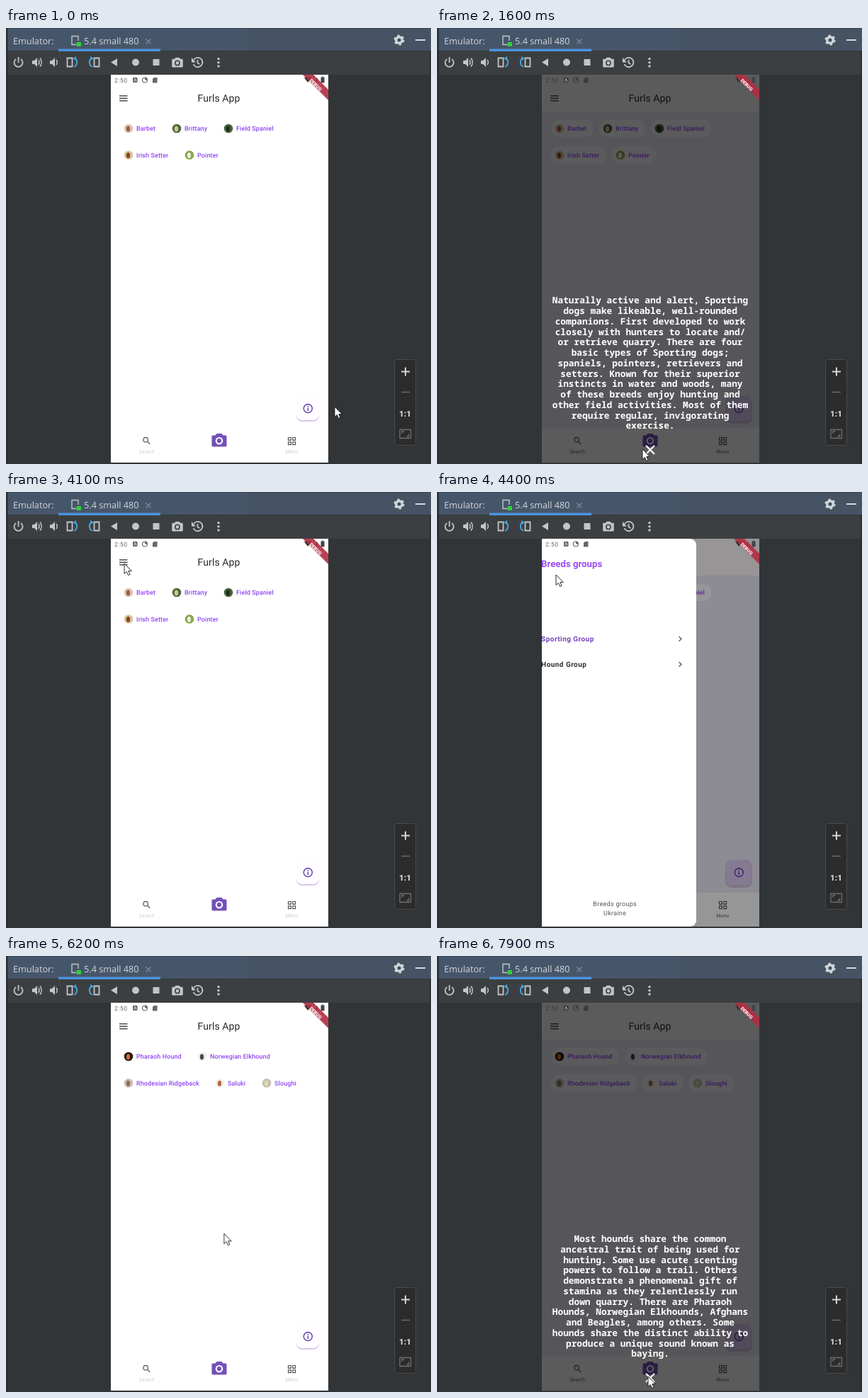
These frames come from a looping animation (600x616 px, 8000 ms). An HTML page:

```html
<!DOCTYPE html>
<html lang="en">
<head>
<meta charset="utf-8">
<title>Emulator demo</title>
<style>
html, body { margin: 0; width: 100%; height: 100%; overflow: hidden; background: #313537; }
svg { display: block; width: 600px; height: 616px; font-family: Roboto, sans-serif; }
.ui { font: 12.7px "Open Sans", sans-serif; fill: #d3d6d9; }
.line { fill: none; stroke: #c3c6c8; stroke-width: 1.8; }
.solid { fill: #c3c6c8; }
.chip { font-size: 9px; font-weight: 500; letter-spacing: .1px; fill: #9045f7; }
.about { font: bold 12.8px "Noto Sans Mono", monospace; fill: #fff; text-anchor: middle; }
.mid { text-anchor: middle; }

/* One loop is 8 s, so 1.25% is 100 ms. */
.tint, .dark, .copy, .drawer, .scrim, .first, .second, .cursor { animation: 8s linear infinite; }
.tint { animation-name: tint; }
.dark { animation-name: dark; }
.copy { animation-name: copy; }
.drawer { animation-name: drawer; }
.scrim { animation-name: scrim; }
.first { animation-name: first; animation-timing-function: step-end; }
.second { animation-name: second; animation-timing-function: step-end; }
.cursor { animation-name: cursor; animation-timing-function: ease-in-out; }

@keyframes tint {
  0%, 8.75% { opacity: 0 } 10%, 28.75% { opacity: 1 } 31.25%, 51.875% { opacity: 0 }
  53.125%, 63.125% { opacity: 1 } 64.75%, 85% { opacity: 0 } 86.25%, 100% { opacity: 1 }
}
@keyframes dark {
  0%, 8.75% { opacity: 0 } 10% { opacity: .03 } 13.75%, 27.5% { opacity: .63 }
  31.25%, 85% { opacity: 0 } 86.25% { opacity: .03 } 90%, 100% { opacity: .63 }
}
@keyframes copy {
  0%, 8.75% { opacity: 0 } 10% { opacity: .5 } 13.75%, 27.5% { opacity: 1 }
  31.25%, 85% { opacity: 0 } 86.25% { opacity: .5 } 90%, 100% { opacity: 1 }
}
@keyframes drawer {
  0%, 51.875% { transform: translateX(-231px); animation-timing-function: ease-out }
  55% { transform: translateX(-12px) }
  56.25%, 62.5% { transform: none; animation-timing-function: ease-in-out }
  65% { transform: translateX(-208px) }
  66.25%, 100% { transform: translateX(-231px) }
}
@keyframes scrim {
  0%, 51.875% { opacity: 0 } 55% { opacity: .4 } 56.25%, 62.5% { opacity: .43 }
  65%, 100% { opacity: 0 }
}
@keyframes first { 0% { visibility: visible } 62.5%, 100% { visibility: hidden } }
@keyframes second { 0% { visibility: hidden } 62.5%, 100% { visibility: visible } }
@keyframes cursor {
  0%, 1.25% { transform: translate(464px, 535px) }
  6.25%, 13.75% { transform: translate(432px, 544px) }
  18.75%, 20% { transform: translate(290px, 595px) }
  23.75%, 33.75% { transform: translate(301px, 591px) }
  41.25% { transform: translate(186px, 130px) }
  45%, 51.25% { transform: translate(167px, 101px) }
  55%, 56.25% { transform: translate(168px, 117px) }
  61.25%, 72.5% { transform: translate(181.5px, 238px) }
  82.5%, 95% { transform: translate(433px, 545px) }
  98.75%, 100% { transform: translate(298px, 594px) }
}
</style>
</head>
<body>
<script>
const box = (x, y, w, h, fill, extra = '') =>
  `<rect x="${x}" y="${y}" width="${w}" height="${h}" fill="${fill}" ${extra}/>`;
const text = (x, y, str, extra = '') => `<text x="${x}" y="${y}" ${extra}>${str}</text>`;
const line = (d, extra = '') => `<path class="line" d="${d}" ${extra}/>`;
const solid = (d, extra = '') => `<path class="solid" d="${d}" ${extra}/>`;
const dot = (x, y, r, fill, extra = '') => `<circle cx="${x}" cy="${y}" r="${r}" fill="${fill}" ${extra}/>`;
const stroke = (d, color, width = 1.2) => `<path d="${d}" fill="none" stroke="${color}" stroke-width="${width}"/>`;

// A breed chip: text start and end, row centre, name, two photo tones.
const chip = ([x, end, y, name, base, spot]) =>
  box(x - 23, y - 12, end - x + 33, 24, '#f9f7fc', 'rx="10" class="tint"') +
  dot(x - 11, y, 6.3, base) +
  `<ellipse cx="${x - 11.5}" cy="${y + .5}" rx="2.6" ry="4" fill="${spot}"/>` +
  text(x, y + 3.2, name, 'class="chip"');

const sporting = [
  [184, 211, 142, 'Barbet', '#d9c7b5', '#a35845'],
  [252, 284, 142, 'Brittany', '#51663a', '#cfc6a4'],
  [325, 377, 142, 'Field Spaniel', '#486339', '#232b22'],
  [184, 229, 179.5, 'Irish Setter', '#dbc39c', '#80452b'],
  [270, 299, 179.5, 'Pointer', '#8ba64c', '#f0efe5']
].map(chip).join('');
const hounds = [
  [184, 247, 142, 'Pharaoh Hound', '#24180f', '#d66d2b'],
  [288, 372, 142, 'Norwegian Elkhound', '#eeeeed', '#45454a'],
  [184, 272, 179.5, 'Rhodesian Ridgeback', '#c5beb5', '#8b6a54'],
  [313, 338, 179.5, 'Saluki', '#f3eeea', '#b56b3d'],
  [379, 410, 179.5, 'Sloughi', '#c2c2aa', '#e6d7b9']
].map(chip).join('');

const about = (copy) => {
  const lines = copy.trim().split('\n');
  return lines.map((str, i) =>
    text(301, 566.3 - (lines.length - 1 - i) * 14.75, str.trim(), 'class="about"')).join('');
};
const sportingCopy = about(`
  Naturally active and alert, Sporting
  dogs make likeable, well-rounded
  companions. First developed to work
  closely with hunters to locate and/
  or retrieve quarry. There are four
  basic types of Sporting dogs;
  spaniels, pointers, retrievers and
  setters. Known for their superior
  instincts in water and woods, many
  of these breeds enjoy hunting and
  other field activities. Most of them
  require regular, invigorating
  exercise.`);
const houndCopy = about(`
  Most hounds share the common
  ancestral trait of being used for
  hunting. Some use acute scenting
  powers to follow a trail. Others
  demonstrate a phenomenal gift of
  stamina as they relentlessly run
  down quarry. There are Pharaoh
  Hounds, Norwegian Elkhounds, Afghans
  and Beagles, among others. Some
  hounds share the distinct ability to
  produce a unique sound known as
  baying.`);

const camera = (x, y, s, fill, hole) => `<g transform="translate(${x} ${y}) scale(${s})">
  <path fill="${fill}" d="M-3.5-9h7l2 2.5H9q1.5 0 1.5 1.5V8Q10.500 9.500 9 9.500H-9Q-10.500 9.500-10.500 8V-5Q-10.500-6.500-9-6.500h3.500z"/>
  ${dot(0, 1.2, 4.2, 'none', `stroke="${hole}" stroke-width="2.2"`)}</g>`;
const speaker = (x) => solid(`M${x} 46h3l4-4v13l-4-4h-3z`);
const rotate = (x, flip) => `<g transform="translate(${x} 48) scale(${flip} 1)">
  ${line('M-7.500-5.500h7v12h-7z', 'stroke-width="1.6"')}
  <path d="M2-5Q7-4 6 1.500T2 6" fill="none" stroke="#3fa4dc" stroke-width="2"/>
  <path d="M5-8v6L0-5z" fill="#3fa4dc"/></g>`;

const chrome =
  box(0, 0, 600, 616, '#313537') + box(0, 0, 600, 33, '#46566a') + box(341, 1, 257, 31, '#455365') +
  box(0, 0, 600, 1, '#384451') + box(0, 33, 600, 33, '#3c3f41') + box(0, 32, 600, 1, '#30353a') +
  box(0, 0, 2.5, 616, '#2b2e30') + box(598, 33, 2, 583, '#2b2e30') +
  text(10, 23, 'Emulator:', 'class="ui"') + text(110, 23, '5.4 small 480', 'class="ui"') +
  box(74, 29.500, 144, 3.500, '#4b93dc') +
  line('M102 18V11.500h-9v12h6', 'style="stroke-width:1.4"') + box(99.500, 20, 6.500, 6, '#32d13d', 'rx="1"') +
  stroke('M197.500 15.500l7 7m0-7l-7 7', '#7f8a95') +
  dot(555, 17, 4.3, 'none', 'stroke="#d5d8da" stroke-width="3.4"') +
  dot(555, 17, 6.500, 'none', 'stroke="#d5d8da" stroke-width="2" stroke-dasharray="3.400 3.406"') +
  box(578, 16, 14, 2, '#d5d8da') +
  line('M14 44a6 6 0 1 0 7 0M17.500 41v8') +
  speaker(37) + line('M46 45q2 3.500 0 7M48 42.500q4.500 6 0 12', 'style="stroke-width:1.500"') +
  speaker(62) + line('M71 45q2.500 3.500 0 7', 'style="stroke-width:1.500"') +
  rotate(94, 1) + rotate(124, -1) +
  solid('M148 48.500l9-5.500v11z') + dot(183, 48.500, 5, '#c3c6c8') + box(207.500, 44, 9, 9, '#c3c6c8') +
  camera(242, 48.500, .74, '#c3c6c8', '#3c3f41') +
  line('M265 45a6.700 6.700 0 1 1-.5 6M270.500 45v4.500l3 1.500') + solid('M262 42v6.500h6z') +
  [43.500, 48.700, 54].map(y => dot(300, y, 1.700, '#c3c6c8')).join('') +
  box(548.500, 468.500, 30, 121, '#2d2c2d', 'rx="3" stroke="#484a4b"') +
  stroke('M558 485.500h12m-6-6v12', '#d5d6d6', 2) + stroke('M558 514.500h12', '#696b6c', 1.500) +
  text(563.500, 548.500, '1:1', 'class="mid" font-size="11.500" font-weight="900" fill="#d0d1d1"') +
  stroke('M556 567.500h15.500v12H556zM559 573v-3h3M568.500 574v3h-3', '#6d6f70', 1.300);

const navLabels = (extra) => text(198.500, 601, 'Search', `class="mid" ${extra}`) +
  text(403.500, 601, 'Menu', `class="mid" ${extra}`);

const screen =
  box(148, 66, 307, 548, '#fff') +
  `<g class="tint">${box(148, 66, 307, 52, '#fbf8f9')}${box(148, 118, 307, 448, '#ebe7f4')}
    ${box(148, 566, 307, 48, '#fbf9f9')}</g>` +
  stroke('M160 95.800h11.500M160 99.300h11.500M160 102.800h11.500', '#2b2b2d', 1.300) +
  text(300.500, 104, 'Furls App', 'class="mid" font-size="14" letter-spacing=".1" fill="#28282b"') +
  `<g class="first">${sporting}</g><g class="second">${hounds}</g>` +
  box(410, 523, 32, 33, '#d9c8ec', 'rx="8"') + box(410, 520, 32, 34, '#fffdff', 'rx="8"') +
  `<g class="tint">${box(407, 521, 38, 38, '#b9aacb', 'rx="9" opacity=".6"')}${box(408, 519.500, 36, 36, '#dccdf2', 'rx="8"')}</g>` +
  dot(426.300, 537.500, 6, 'none', 'stroke="#6037b0" stroke-width="1.400"') +
  box(425.600, 536.500, 1.400, 4.500, '#6037b0') + box(425.600, 534, 1.400, 1.500, '#6037b0') +
  stroke('M200 584.700l3.300 3.300M200.500 581.800a3.300 3.300 0 1 1-6.600 0a3.300 3.300 0 1 1 6.600 0', '#666', 1.300) +
  stroke('M398.500 578.500h3.800v3.800h-3.800zM404.800 578.500h3.800v3.800h-3.800zM398.500 584.800h3.800v3.800h-3.800zM404.800 584.800h3.800v3.800h-3.800z', '#555', 1.200) +
  camera(301, 582, 1, '#7350ba', '#fff') +
  navLabels('font-size="7.300" fill="#d0d0d0"') +
  `<g class="tint">${navLabels('font-size="7.300" fill="#777"')}</g>`;

const chevron = (y) => stroke(`M353.500 ${y - 3.300}l3.300 3.300l-3.300 3.300`, '#555', 1.300);
const group = 'font-size="10" font-weight="700" letter-spacing=".45"';
const foot = 'class="mid" font-size="9" letter-spacing=".3" fill="#55555a"';
const drawer =
  box(148, 66, 307, 548, '#000', 'class="scrim"') +
  `<g class="drawer">
    ${box(128, 66, 250, 548, '#fff', 'rx="9"')}
    ${text(159, 105.500, 'Breeds groups', 'font-size="13.200" font-weight="700" fill="#9a4df5"')}
    <g class="first">${text(159, 211, 'Sporting Group', group + ' fill="#7442bd"')}${text(159, 247, 'Hound Group', group + ' fill="#2e2c33"')}</g>
    <g class="second">${text(159, 211, 'Sporting Group', group + ' fill="#2e2c33"')}${text(159, 247, 'Hound Group', group + ' fill="#7442bd"')}</g>
    ${chevron(207.500)}${chevron(243.500)}
    ${text(263, 584.500, 'Breeds groups', foot)}${text(263, 597.500, 'Ukraine', foot)}
  </g>`;

const overlay =
  box(148, 66, 307, 548, '#000', 'class="dark"') +
  `<g class="copy"><g class="first">${sportingCopy}</g><g class="second">${houndCopy}</g>
    ${stroke('M295 590l12 12m0-12l-12 12', '#fff', 2.200)}</g>`;

const status =
  `<g opacity=".75">${text(153, 76.800, '2:50', 'font-size="8.600" letter-spacing=".5" fill="#333"')}
    ${box(179, 70, 6.500, 7, '#333', 'rx="1"')}${stroke('M180.800 75.500l1.500-4l1.500 4', '#ddd', .9)}
    ${dot(196, 73.500, 3.500, 'none', 'stroke="#333" stroke-width="1.200"')}<path d="M196 70a3.500 3.500 0 0 1 3.500 3.500H196z" fill="#333"/>
    <path d="M209 70h4.500v7.500h-6.500V72z" fill="#333"/></g>
  <path d="M421 70q5-3 10 0l-5 7zM434 77.500l6-7v7z" fill="#333"/>
  ${box(444.500, 69.500, 5, 8, '#444', 'rx=".8"')}${box(446, 68.500, 2, 1, '#444')}
  <path d="M419 66h15l21 21v15z" fill="#b22e43" fill-opacity=".9"/>
  <text transform="translate(437.300 80.300) rotate(45)" y="2.300" class="mid" font-size="6.600" font-weight="900" fill="#fff">DEBUG</text>`;

const cursor = `<path class="cursor" d="M0 0V14.500L3.300 11.500L5.600 16.600L8 15.500L5.800 10.600H10.300Z"
  fill="#fff" stroke="#17171b" stroke-width=".9" stroke-linejoin="round"/>`;

document.body.innerHTML = `<svg viewBox="0 0 600 616" text-rendering="geometricPrecision">
  <clipPath id="phone"><rect x="148" y="66" width="307" height="548"/></clipPath>
  ${chrome}<g clip-path="url(#phone)">${screen}${drawer}${overlay}${status}</g>${cursor}</svg>`;
</script>
</body>
</html>
```
